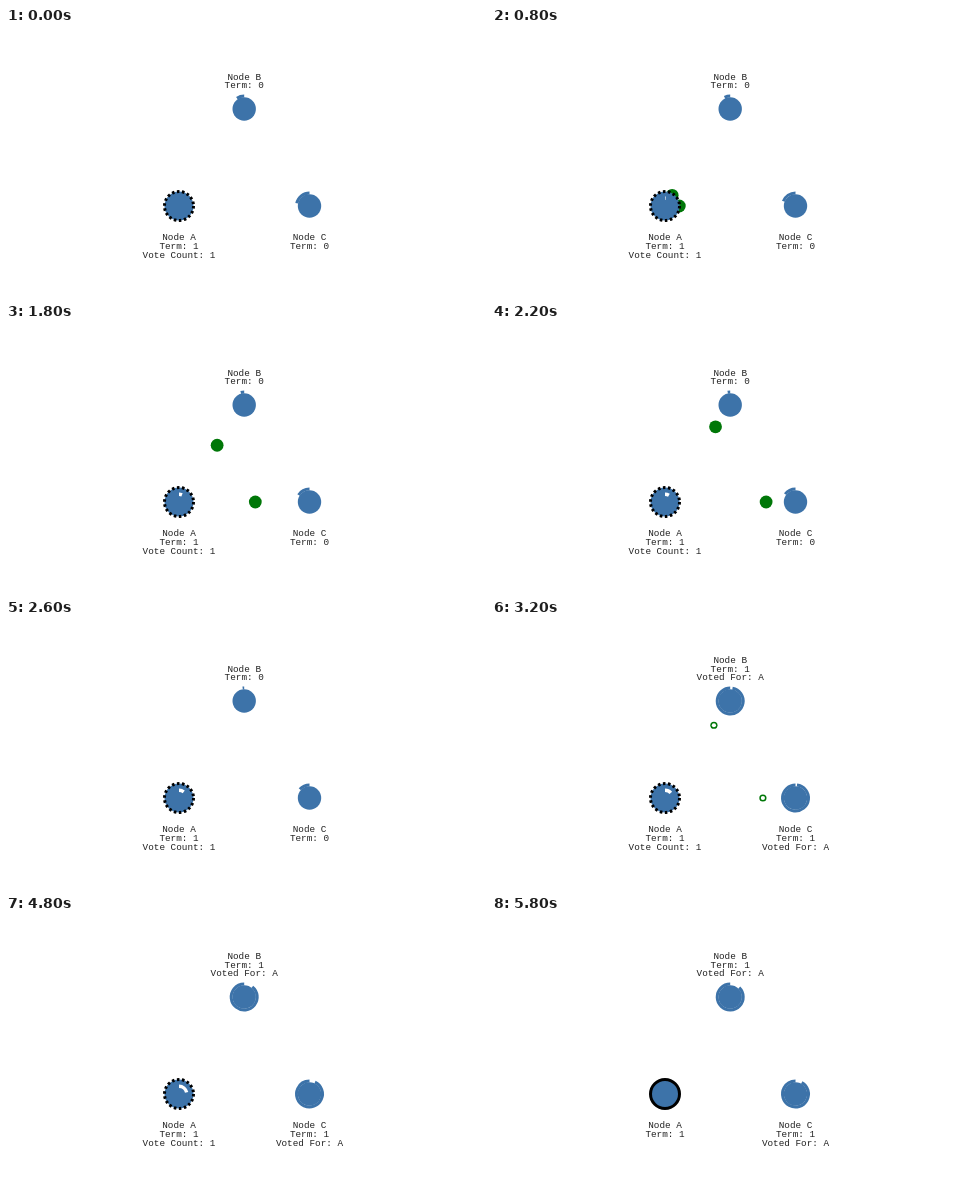
An HTML page with a canvas that plays this animation: 480 by 268 pixels, repeating every 6 s.

```html
<!DOCTYPE html>
<html>
<head>
<meta charset="utf-8">
<title>Leader election</title>
<style>
html, body { margin: 0; width: 100%; height: 100%; overflow: hidden; background: #fff; }
canvas { display: block; }
</style>
</head>
<body>
<canvas id="stage" width="480" height="268"></canvas>
<script>
const ctx = document.getElementById("stage").getContext("2d");
const BLUE = "#3d73a9", GREEN = "#007708";
const LOOP = 6000, STEP = 200;
const SEND = 569, ARRIVE = 2629, ELECTED = 5000, SETTLED = 5800;
const TOP = -Math.PI / 2, LINE = 8.6;

const A = { x: 173, y: 178 };
// left: degrees on the timer at the start; rates are degrees per second
const B = { name: "B", x: 238.2, y: 81, left: 34, rate: 10.4, newRate: 17.7, textY: 51.5, up: true };
const C = { name: "C", x: 303.5, y: 178, left: 78, rate: 11.5, newRate: 11.5, textY: 212.4 };

const rad = deg => deg * Math.PI / 180;

function disc(x, y, r, color) {
  ctx.beginPath();
  ctx.arc(x, y, r, 0, 2 * Math.PI);
  ctx.fillStyle = color;
  ctx.fill();
}

// Ring section, in degrees clockwise from the top
function arc(p, r, width, from, to, color) {
  ctx.beginPath();
  ctx.arc(p.x, p.y, r, TOP + rad(from), TOP + rad(to));
  ctx.lineWidth = width;
  ctx.strokeStyle = color;
  ctx.stroke();
}

function label(x, y, lines) {
  ctx.fillStyle = "#222";
  lines.forEach((line, i) => ctx.fillText(line, x, y + i * LINE));
}

function message(from, to, p, reply) {
  const x = from.x + (to.x - from.x) * p;
  const y = from.y + (to.y - from.y) * p;
  if (reply) {
    disc(x, y, 3.6, GREEN);
    disc(x, y, 2.1, "#fff");
  } else {
    disc(x, y, 6.4, GREEN);
  }
}

function candidate(t) {
  const leader = t >= ELECTED;
  disc(A.x, A.y, 14.5, BLUE);
  if (t > SEND && t <= ELECTED) arc(A, 7.8, 3.4, 0, (t - SEND) * 0.0185, "#fff");
  const dash = 2 * Math.PI * 14.5 / 36;
  ctx.setLineDash(leader ? [] : [dash, dash]);
  arc(A, 14.5, 3, 90, 450, "#000");
  ctx.setLineDash([]);
  label(A.x, 212.4, ["Node A", "Term: 1"].concat(leader ? [] : "Vote Count: 1"));
}

function follower(n, t) {
  const voted = t > ARRIVE;
  const elapsed = voted
    ? (t - ARRIVE) / 1000 * n.newRate
    : 360 - n.left + t / 1000 * n.rate;
  disc(n.x, n.y, 11.7, BLUE);
  arc(n, 13, 3, elapsed, 360, BLUE);
  const lines = ["Node " + n.name, "Term: " + (voted ? 1 : 0)];
  if (voted) lines.push("Voted For: A");
  label(n.x, n.textY - (n.up && voted ? LINE : 0), lines);
}

function draw(now) {
  let t = now % LOOP;
  t -= t % STEP;
  if (t > ELECTED) t = t < SETTLED ? ELECTED : ELECTED + 100;

  ctx.fillStyle = "#fff";
  ctx.fillRect(0, 0, 480, 268);
  ctx.font = '9.33px "Liberation Mono", "Courier New", monospace';
  ctx.textAlign = "center";

  for (const n of [B, C]) {
    if (t > SEND && t < ARRIVE) message(A, n, (t - SEND) / 2105, false);
    else if (t > ARRIVE && t < ELECTED) message(n, A, (t - ARRIVE) / 2286, true);
  }
  candidate(t);
  follower(B, t);
  follower(C, t);
}

const start = performance.now();
function tick() {
  draw(performance.now() - start);
  requestAnimationFrame(tick);
}
tick();
</script>
</body>
</html>
```
